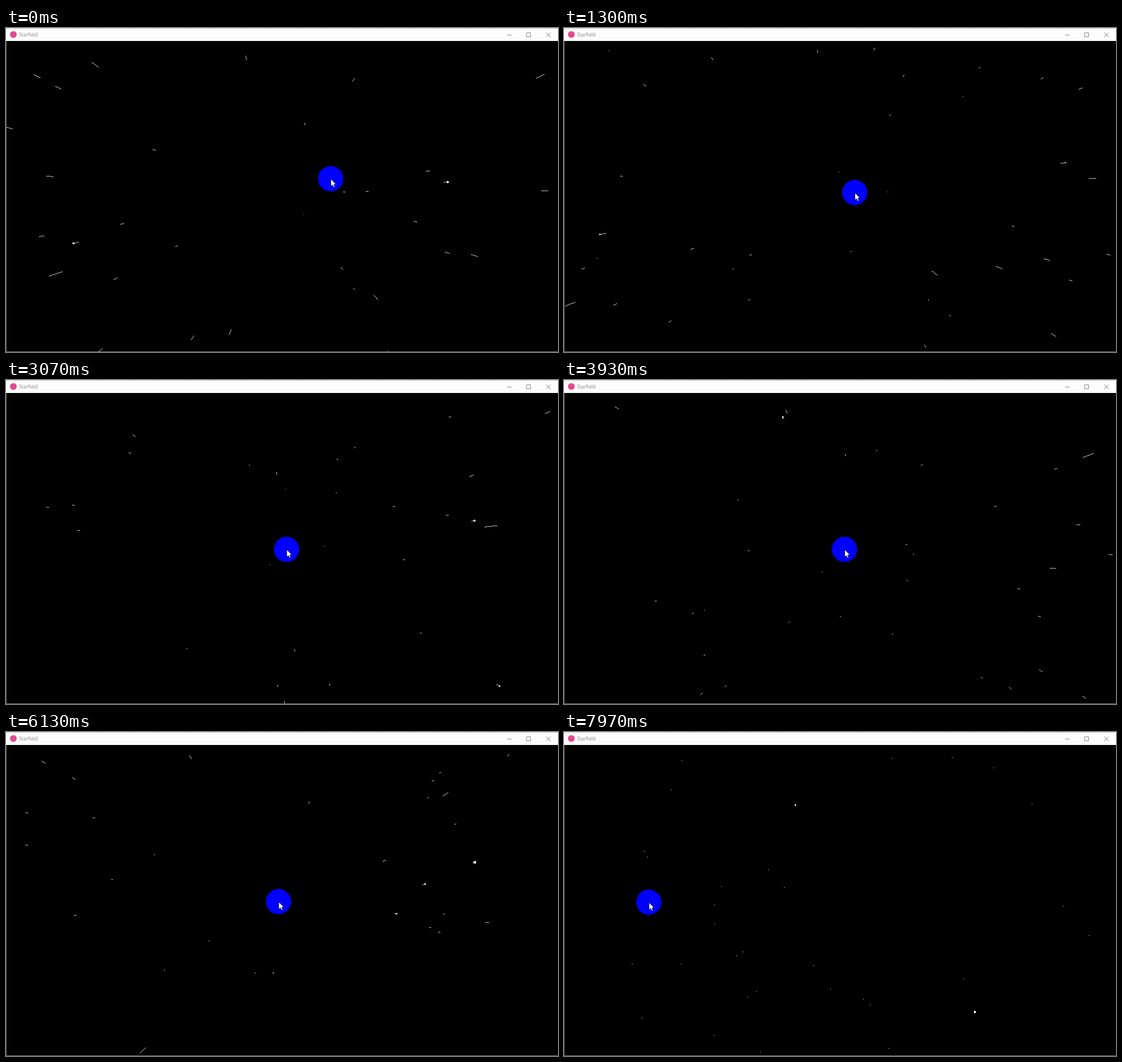
These frames come from a looping animation (976 by 574 pixels, 8 s). An HTML page:

```html
<!DOCTYPE html>
<html lang="en">
<head>
<meta charset="utf-8">
<title>Starfield</title>
<style>
  html, body { margin: 0; width: 100%; height: 100%; overflow: hidden; background: #000; }
  svg { display: block; width: 100vw; height: 100vh; }
  text { font: 8.5px "Open Sans", "Noto Sans", sans-serif; fill: #858585; }
</style>
</head>
<body>
<svg viewBox="0 0 976 574">
  <rect width="976" height="574" fill="#000"/>
  <g shape-rendering="crispEdges">
    <circle id="ball" r="22.3" fill="#00f"/>
    <path id="trails" stroke="#fff" stroke-width=".75" fill="none"/>
    <path id="heads" fill="#fff"/>
  </g>
  <path id="cursor" d="M.4 .4V13.6L3.3 10.9L5.3 15.2L7.4 14.3L5.5 10H9.4Z" fill="#fff" stroke="#000" stroke-width=".7"/>
  <rect width="976" height="23" fill="#fdfdfd"/>
  <path d="M0 .5H976" stroke="#aaa" stroke-dasharray="2 1"/>
  <path d="M.5 23V574" stroke="#66665c"/>
  <path d="M0 573.5H976" stroke="#777"/>
  <circle cx="13" cy="11.5" r="6" fill="#e7488f"/>
  <text x="23" y="15">Starfield</text>
  <path d="M886 12.5H894M920.5 8.5H927.5V15.5H920.5ZM955 8L963 16M963 8L955 16" fill="none" stroke="#777" stroke-width=".9"/>
</svg>
<script>
const LOOP = 8000, FRAMES = 240, DEPTH = 45, COUNT = 100;
const W = 976, H = 550, CX = 488, CY = 299;
const CALM = 400; // left of this the stars only twinkle

// time, x, y of the pointer
const path = [
  [0, 574, 267], [1300, 514, 291.5], [2130, 496, 300], [5600, 496, 300],
  [6130, 482, 300.5], [7330, 327, 307.5], [7970, 149, 301.5]
];

const $ = id => document.getElementById(id);
const ball = $('ball'), cursor = $('cursor'), trails = $('trails'), heads = $('heads');

function rand(a, b, c) {
  let h = Math.imul(a + 11, 374761393) ^ Math.imul(b + 7, 668265263) ^ Math.imul(c + 3, 1274126177);
  h = Math.imul(h ^ (h >>> 15), 2246822519);
  h = Math.imul(h ^ (h >>> 13), 3266489917);
  return ((h ^ (h >>> 16)) >>> 0) / 4294967296;
}

const slope = (i, axis) => {
  const a = path[i], b = path[i + 1];
  return (b[axis] - a[axis]) / (b[0] - a[0]);
};

function tangent(i, axis) {
  if (i === 0) return slope(0, axis);
  if (i === path.length - 1) return slope(i - 1, axis);
  const a = slope(i - 1, axis), b = slope(i, axis);
  return a * b > 0 ? 2 * a * b / (a + b) : 0;
}

// smooth curve through the pointer positions without overshoot
function pointer(t, axis) {
  const i = path.findLastIndex(p => p[0] <= t);
  const a = path[i], b = path[i + 1];
  if (!b) return a[axis];
  const span = b[0] - a[0], u = (t - a[0]) / span, v = 1 - u;
  return a[axis] * v * v * (1 + 2 * u) + b[axis] * u * u * (3 - 2 * u)
    + span * u * v * (tangent(i, axis) * v - tangent(i + 1, axis) * u);
}

// speed follows the pointer; travel is its running sum
const speed = [], travel = [];
for (let k = 0; k < FRAMES; k++) {
  speed[k] = (pointer(k * LOOP / FRAMES, 1) / 574) ** 4.4;
  travel[k] = k ? travel[k - 1] + speed[k] : 0;
}

function draw(k) {
  const now = k * LOOP / FRAMES, mx = pointer(now, 1), my = pointer(now, 2);
  const calm = mx < CALM;
  let lines = '', dots = '';

  for (let i = 0; i < COUNT; i++) {
    const run = rand(i, 0, 0) * DEPTH - travel[k];
    const lap = calm ? 1000 + k : Math.floor(run / DEPTH);
    const z = Math.max(0.1, calm ? rand(i, lap, 4) * DEPTH : run - lap * DEPTH);
    const step = calm || z + speed[k] > DEPTH ? 0 : speed[k];
    const x = (rand(i, lap, 1) - 0.5) * W * DEPTH;
    const y = (rand(i, lap, 2) - 0.5) * H * DEPTH;
    const size = 2 * rand(i, lap, 3) ** 8;

    const hx = CX + x / z, hy = CY + y / z;
    const tx = CX + x / (z + step), ty = CY + y / (z + step);
    if (tx < 0 || tx > W || ty < 23 || ty > 573) continue;

    const streak = Math.hypot(hx - tx, hy - ty) > 1;
    if (streak) lines += `M${tx.toFixed(1)} ${ty.toFixed(1)}L${hx.toFixed(1)} ${hy.toFixed(1)}`;
    if (size > 1) {
      const r = size.toFixed(1), d = (2 * size).toFixed(1);
      dots += `M${(hx - size).toFixed(1)} ${hy.toFixed(1)}a${r} ${r} 0 1 0 ${d} 0a${r} ${r} 0 1 0 -${d} 0z`;
    } else if (!streak) {
      dots += `M${Math.round(hx)} ${Math.round(hy)}h1v1h-1z`;
    }
  }

  trails.setAttribute('d', lines);
  heads.setAttribute('d', dots);
  ball.setAttribute('cx', mx);
  ball.setAttribute('cy', my);
  cursor.setAttribute('transform', `translate(${mx} ${my})`);
}

const start = performance.now();
let shown = -1;
function tick() {
  const t = (performance.now() - start) % LOOP;
  const k = Math.min(FRAMES - 1, Math.floor(t * FRAMES / LOOP + 0.12));
  if (k !== shown) draw(shown = k);
  requestAnimationFrame(tick);
}
tick();
</script>
</body>
</html>
```
